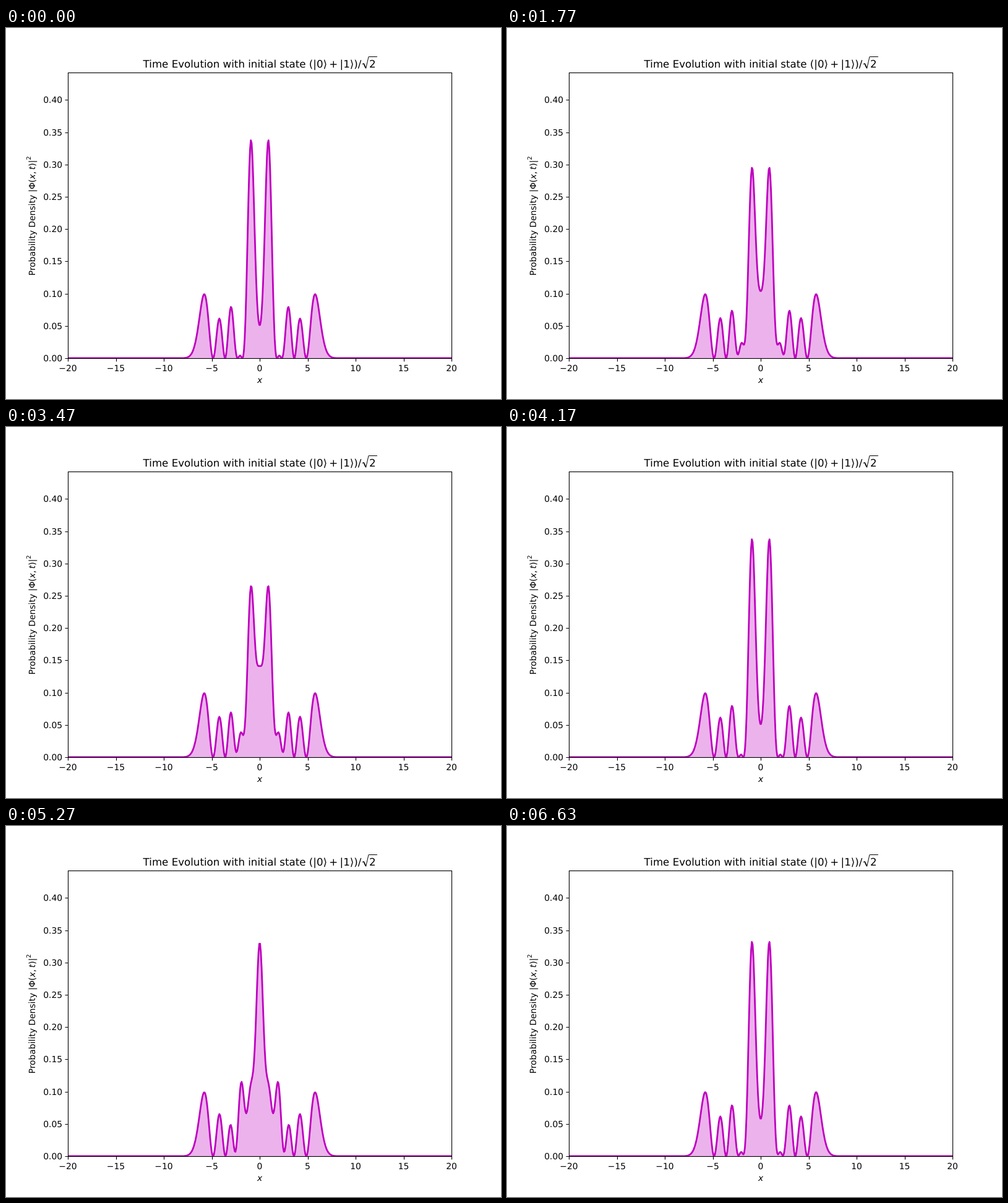
An HTML page that plays this animation: 800x600 px, repeating every 6660 ms.

```html
<!DOCTYPE html>
<html lang="en">
<head>
<meta charset="utf-8">
<title>Time Evolution</title>
<style>
  html, body { margin: 0; width: 100%; height: 100%; overflow: hidden; background: #fff; }
  svg { display: block; width: 800px; height: 600px; }
  text { font: 13.889px "DejaVu Sans", sans-serif; text-rendering: geometricPrecision; white-space: pre; }
  .title { font-size: 16.667px; }
  .it { font-style: italic; }
  .sup { font-size: 9.722px; }
  .axis { fill: none; stroke: #000; stroke-width: 1.11; }
  #area { fill: #bf00bf; fill-opacity: .3; }
  #curve { fill: none; stroke: #bf00bf; stroke-width: 2.778; stroke-linejoin: round; }
</style>
</head>
<body>
<svg viewBox="0 0 800 600">
  <clipPath id="plot"><rect x="100" y="72" width="620" height="462"/></clipPath>
  <g clip-path="url(#plot)"><path id="area"/><path id="curve"/></g>
  <path id="ticks" class="axis"/>
  <rect class="axis" x="100.5" y="72.5" width="620" height="462"/>
  <g id="labels"></g>
  <text class="title" x="221.6" y="64">Time Evolution with initial state (|0⟩<tspan dx="3.25">+</tspan><tspan dx="3.25">|1⟩)/</tspan></text>
  <path d="M575.6 58.6L578.2 57.2" fill="none" stroke="#000" stroke-width="1"/>
  <path d="M578 57.4L581.4 64.6" fill="none" stroke="#000" stroke-width="1.7"/>
  <path d="M581.6 65.6L586 46.5H600" fill="none" stroke="#000" stroke-width="1"/>
  <text class="title" x="587" y="64">2</text>
  <text class="it" x="410" y="574" text-anchor="middle">x</text>
  <text transform="translate(46.6 400.4) rotate(-90)">Probability Density |Φ(<tspan class="it">x</tspan>,<tspan class="it" dx="2.7">t</tspan>)|<tspan class="sup" dy="-6.2">2</tspan></text>
</svg>
<script>
const LEFT = 100, BOTTOM = 534, WIDTH = 620, HEIGHT = 462;
const POINTS = 500, FRAMES = 200, LOOP = 6660;
const LEVEL = 10, OMEGA = 0.5, DURATION = 10;
const $ = id => document.getElementById(id);

// Normalised harmonic oscillator eigenfunction
function eigenstate(n, x) {
  const u = x * Math.sqrt(OMEGA);
  let prev = 0, cur = (OMEGA / Math.PI) ** 0.25 * Math.exp(-u * u / 2);
  for (let k = 0; k < n; k++) {
    [prev, cur] = [cur, Math.sqrt(2 / (k + 1)) * u * cur - Math.sqrt(k / (k + 1)) * prev];
  }
  return cur;
}

const samples = Array.from({ length: POINTS }, (_, i) => {
  const x = -20 + 40 * i / (POINTS - 1);
  const low = eigenstate(0, x), high = eigenstate(LEVEL, x);
  return { px: toX(x), mean: (low * low + high * high) / 2, cross: low * high };
});

function toX(x) { return LEFT + (x + 20) / 40 * WIDTH; }
function beat(frame) { return Math.cos(LEVEL * OMEGA * DURATION * frame / (FRAMES - 1)); }
function density(s, c) { return s.mean + s.cross * c; }

const lowestBeat = Math.min(...Array.from({ length: FRAMES }, (_, k) => beat(k)));
const yMax = Math.max(...samples.map(s => density(s, lowestBeat)));
function toY(p) { return BOTTOM - p / yMax * HEIGHT; }

function addLabel(text, x, y, anchor) {
  const el = document.createElementNS("http://www.w3.org/2000/svg", "text");
  el.setAttribute("x", x);
  el.setAttribute("y", y);
  el.setAttribute("text-anchor", anchor);
  el.textContent = text;
  $("labels").append(el);
}

function drawAxes() {
  let d = "";
  for (let v = -20; v <= 20; v += 5) {
    d += `M${Math.round(toX(v)) + 0.5} 534.5v5`;
    addLabel(String(v).replace("-", "−"), toX(v), 555, "middle");
  }
  for (let i = 0; i <= 8; i++) {
    const y = Math.round(toY(i * 0.05));
    d += `M100.5 ${y + 0.5}h-5`;
    addLabel((i * 0.05).toFixed(2), 91.1, y + 5, "end");
  }
  $("ticks").setAttribute("d", d);
}

// Frames begin at 0, 30 and 70 ms of every 100 ms
function frameAt(ms) {
  const part = ms % 100;
  return 3 * Math.floor(ms / 100) + (part >= 30) + (part >= 70);
}

function draw(ms) {
  const c = beat(frameAt(ms));
  const line = samples.map(s => `${s.px.toFixed(2)} ${toY(density(s, c)).toFixed(2)}`).join("L");
  $("curve").setAttribute("d", "M" + line);
  $("area").setAttribute("d", `M${LEFT} ${BOTTOM}L${line}L${LEFT + WIDTH} ${BOTTOM}Z`);
}

drawAxes();
draw(0);
let start;
requestAnimationFrame(function tick(now) {
  start ??= now;
  draw((now - start) % LOOP);
  requestAnimationFrame(tick);
});
</script>
</body>
</html>
```
